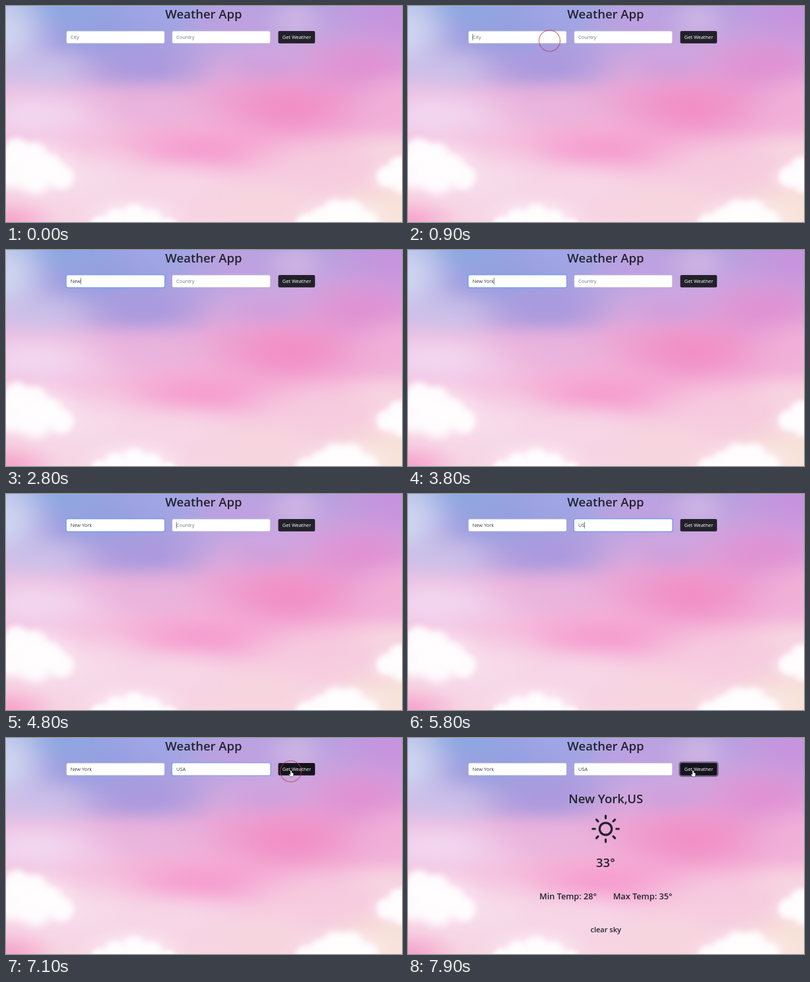
An HTML page with a canvas that plays this animation: 600x328 px, repeating every 8 s.

```html
<!DOCTYPE html>
<html lang="en">
<head>
<meta charset="utf-8">
<title>Weather App</title>
<style>
html, body { margin: 0; width: 100%; height: 100%; overflow: hidden; }
canvas, svg { position: absolute; left: 0; top: 0; }
text { font: 7.4px "Open Sans", "Noto Sans", sans-serif; fill: #353a42; }
.head { font-weight: 600; fill: #23232e; text-anchor: middle; }
.glow { fill: none; stroke: #6f97f8; stroke-width: 3; }
</style>
</head>
<body>
<canvas id="sky" width="600" height="328"></canvas>
<svg width="600" height="328" viewBox="0 0 600 328">
  <text class="head" x="299.5" y="18.5" style="font-size:18.5px">Weather App</text>
  <g id="fields"></g>
  <rect id="buttonRing" class="glow" x="411.8" y="37.3" width="57.2" height="20.2" rx="3" style="stroke:#5a5368;stroke-opacity:.75"/>
  <rect id="button" x="412.5" y="38" width="55.7" height="18.8" rx="2"/>
  <text x="440.5" y="50.2" text-anchor="middle" style="fill:#fff;font-weight:500">Get Weather</text>
  <path id="caret" stroke="#444" stroke-width=".7"/>
  <g id="result">
    <text class="head" x="299.7" y="98.7" style="font-size:18.5px">New York,US</text>
    <g id="sun" transform="translate(299.5 138)" fill="none" stroke="#23232e" stroke-width="3.2" stroke-linecap="round">
      <circle r="9.2"/>
    </g>
    <text class="head" x="299.5" y="196" style="font-size:18.4px">33°</text>
    <text class="head" x="242.5" y="245" style="font-size:12.7px">Min Temp: 28°</text>
    <text class="head" x="355.5" y="245" style="font-size:12.7px">Max Temp: 35°</text>
    <text class="head" x="299.7" y="294.5" style="font-size:11px">clear sky</text>
  </g>
  <circle id="click" r="16" fill="none" stroke="#b8384c" stroke-width="1.3" stroke-dasharray="1.4 .8"/>
  <path id="arrow" d="M0 0V10L2.4 7.8L4 11.2L5.4 10.5L3.9 7.3H7Z" fill="#fff" stroke="#222" stroke-width=".6"/>
  <path id="hand" d="M-1.2 -4Q0 -5.2 1 -4V-1Q2-1.7 2.6-.6Q3.4-.8 3.6 .3V2.6L2.8 5H-1L-3.2 1.6Q-2.8 .4-1.2 1.6Z" fill="#fff" stroke="#222" stroke-width=".5"/>
</svg>
<script>
const $ = id => document.getElementById(id);
const ctx = $('sky').getContext('2d');

function blob(x, y, rx, ry, rgb, alpha, core = 0) {
  ctx.save();
  ctx.translate(x, y);
  ctx.scale(rx, ry);
  const g = ctx.createRadialGradient(0, 0, core, 0, 0, 1);
  for (let i = 0; i <= 6; i++) {
    const k = i / 6;
    g.addColorStop(k, `rgba(${rgb},${alpha * (1 - k * k * (3 - 2 * k))})`);
  }
  ctx.fillStyle = g;
  ctx.fillRect(-1, -1, 2, 2);
  ctx.restore();
}

function paintSky() {
  const base = ctx.createLinearGradient(0, 0, 0, 328);
  ['#b4a4e0', '#cba8e0', '#e8aad8', '#f4b8da', '#f6cbe0', '#f7d6e2']
    .forEach((c, i) => base.addColorStop(i / 5, c));
  ctx.fillStyle = base;
  ctx.fillRect(0, 0, 600, 328);
  // x, y, rx, ry, colour
  [
    [150, 40, 240, 110, '142,158,224'],
    [80, 0, 130, 50, '138,168,224'],
    [0, 40, 90, 110, '210,220,242'],
    [60, 98, 120, 50, '202,194,234'],
    [215, 92, 130, 60, '168,152,222'],
    [240, 5, 100, 50, '158,166,230'],
    [350, 25, 100, 55, '190,160,224'],
    [440, 20, 60, 45, '206,180,228'],
    [600, 10, 160, 90, '202,144,220'],
    [540, 90, 150, 70, '226,142,210'],
    [395, 90, 90, 40, '206,160,222'],
    [40, 165, 210, 75, '242,220,242'],
    [220, 150, 130, 50, '232,180,222'],
    [430, 155, 170, 75, '242,138,196'],
    [600, 145, 110, 60, '242,176,216'],
    [300, 218, 170, 55, '246,154,206'],
    [120, 265, 150, 75, '247,222,236'],
    [260, 275, 140, 55, '247,216,232'],
    [500, 250, 180, 70, '247,204,222'],
    [590, 220, 110, 40, '247,216,224'],
    [600, 310, 150, 75, '248,230,214'],
    [390, 300, 130, 55, '247,214,222'],
    [0, 328, 95, 42, '245,158,202']
  ].forEach(b => blob(...b, .85));
  // soft haze around the clouds
  [[50, 245, 85, 60], [195, 320, 95, 42], [595, 258, 60, 38], [510, 322, 95, 45]]
    .forEach(h => blob(...h, '255,246,250', .7));
  // cloud puffs: x, y, radius
  [
    [16, 220, 28], [42, 228, 30], [66, 245, 28], [84, 260, 26], [8, 248, 42], [44, 258, 38],
    [194, 319, 25], [166, 326, 25], [220, 327, 25], [142, 333, 20], [246, 336, 20],
    [596, 245, 24], [577, 259, 22], [602, 264, 28],
    [499, 313, 27], [523, 313, 27], [477, 323, 24], [455, 331, 23], [546, 329, 26], [508, 330, 36]
  ].forEach(([x, y, r]) => blob(x, y, r, r, '255,253,254', .95, .35));
}

const svgNode = (tag, parent, attrs) => {
  const n = document.createElementNS('http://www.w3.org/2000/svg', tag);
  for (const k in attrs) n.setAttribute(k, attrs[k]);
  return parent.appendChild(n);
};

function makeField(x, hint) {
  const box = { x, y: 38.2, width: 148.2, height: 18.4, rx: 2 };
  const glow = svgNode('rect', $('fields'), { ...box, class: 'glow' });
  svgNode('rect', $('fields'), { ...box, fill: '#fff', stroke: '#ced4da', 'stroke-width': .5 });
  const label = svgNode('text', $('fields'), { x: x + 6, y: 50.2 });
  return (value, focus) => {
    label.textContent = value || hint;
    label.style.fill = value ? '' : '#6f767f';
    glow.style.opacity = focus;
    return x + 6.2 + (value ? label.getComputedTextLength() : 0);
  };
}

const city = makeField(91.8, 'City');
const country = makeField(252, 'Country');
for (let a = 0; a < 360; a += 45)
  svgNode('path', $('sun'), { d: 'M0 -16.2V-19.8', transform: `rotate(${a})` });

const clamp = v => Math.max(0, Math.min(1, v));
const typed = (word, t, start, step) => word.slice(0, Math.max(0, Math.floor((t - start) / step) + 1));
const show = (id, on) => $(id).style.display = on ? '' : 'none';
const place = (id, x, y) => $(id).setAttribute('transform', `translate(${x} ${y})`);

function draw(t) {
  const cityFocus = clamp((t - 900) / 150) * clamp((4950 - t) / 150);
  const countryFocus = clamp((t - 4800) / 150) * clamp((7200 - t) / 150);
  const cityText = typed('New York', t, 1850, 250);
  const countryText = typed('USA', t, 5450, 300);
  const cityEnd = city(cityText, cityFocus);
  const countryEnd = country(countryText, countryFocus);

  // the caret restarts its blink after each key
  const inCity = t < 4800;
  const lastKey = inCity ? (t < 1850 ? 850 : 1850 + 250 * (cityText.length - 1))
                         : (t < 5450 ? 4800 : 5450 + 300 * (countryText.length - 1));
  show('caret', t >= 850 && t < 7050 && (t - lastKey) % 1060 < 530);
  $('caret').setAttribute('d', `M${inCity ? cityEnd : countryEnd} 42.3v10`);

  const k = clamp((t - 6400) / 600);
  const x = 215 + 217 * k * k * (3 - 2 * k);
  const overButton = x >= 412;
  show('arrow', t > 6400 && x > 240 && x < 252 || x > 401 && !overButton);
  show('hand', overButton);
  place('arrow', x, 50);
  place('hand', x, 53.8);

  const secondClick = t >= 7050 && t < 7350;
  show('click', t >= 850 && t < 1150 || secondClick);
  place('click', t < 2000 ? 214.5 : 431.5, t < 2000 ? 52.8 : 50.6);

  $('button').style.fill = overButton ? '#15131d' : '#22212a';
  $('buttonRing').style.opacity = clamp((t - 7100) / 150);
  show('result', t >= 7500);
}

paintSky();
const start = performance.now();
(function tick() {
  draw((performance.now() - start) % 8000);
  requestAnimationFrame(tick);
})();
</script>
</body>
</html>
```
